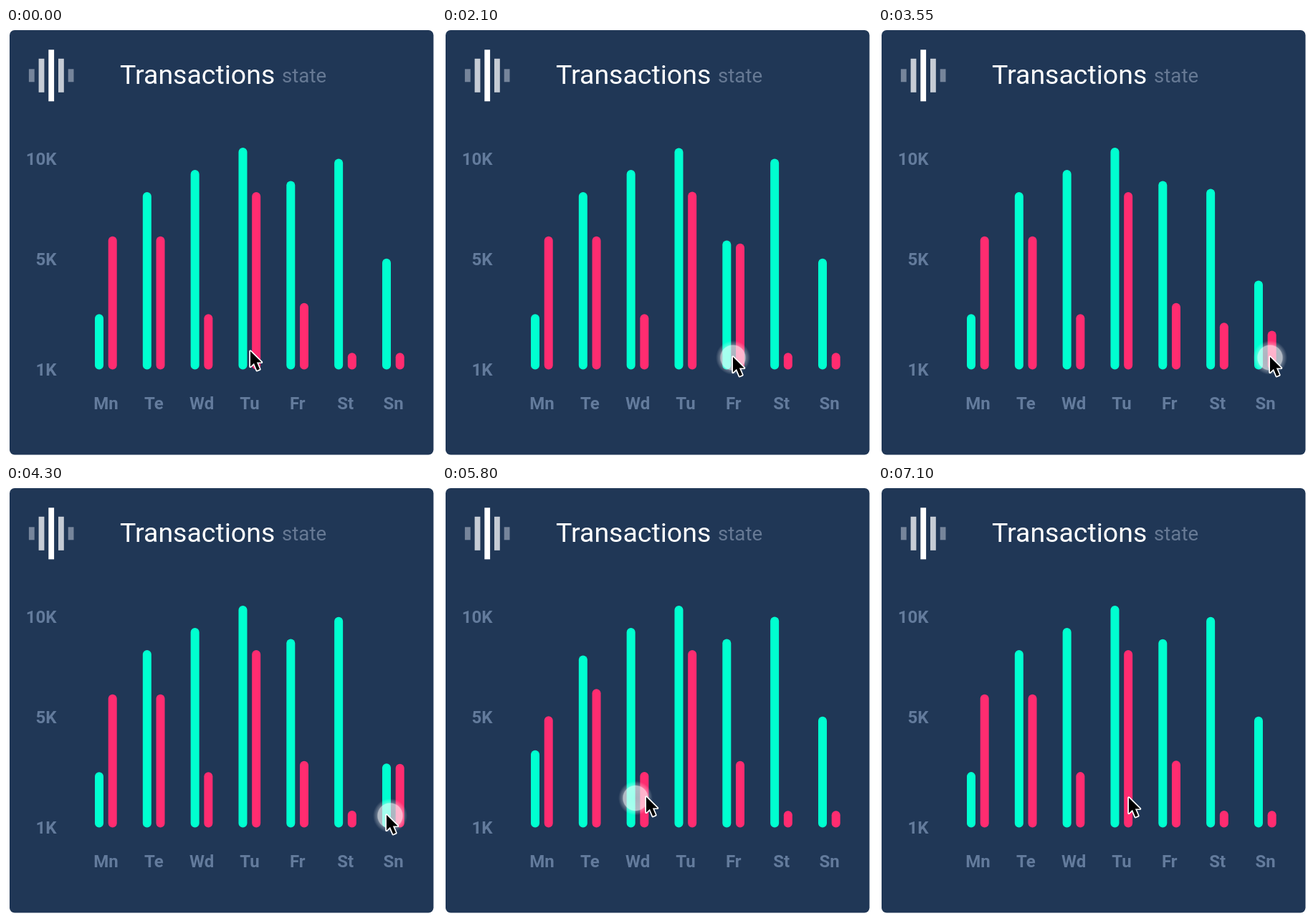
An HTML page with a canvas that plays this animation: 600 by 600 pixels, repeating every 7.15 s.

```html
<!DOCTYPE html>
<html lang="en">
<head>
<meta charset="utf-8">
<title>Transactions chart</title>
<style>
  html, body { margin: 0; width: 100%; height: 100%; overflow: hidden; background: #fff; }
  canvas { display: block; width: 600px; height: 600px; }
</style>
</head>
<body>
<canvas id="stage"></canvas>
<script>
const LOOP = 7150, STEP = 50;
const PRESS = 450, RELEASE = 6420;
const FLOOR = 476.5, UNIT = 15.475;          // chart base line, pixels per value
const BAR_W = 12, PINK_DX = 18.7, FIRST_X = 124, DAY_GAP = 66.83;
const SETTLE = 150, HIT_LAG = 45, TOUCH_LAG = 14, HIT_PAD = 4, TICK = 5;

const days = [
  { name: 'Mn', green: 5,  pink: 12 },
  { name: 'Te', green: 16, pink: 12 },
  { name: 'Wd', green: 18, pink: 5 },
  { name: 'Tu', green: 20, pink: 16 },
  { name: 'Fr', green: 17, pink: 6 },
  { name: 'St', green: 19, pink: 1.5 },
  { name: 'Sn', green: 10, pink: 1.5 }
];
days.forEach((day, i) => day.x = FIRST_X + i * DAY_GAP);

// Pointer rests, each followed by a straight drag: time, x, y
const path = [
  [0, 341, 449], [1400, 341, 449], [1540, 406, 457], [2200, 406, 457],
  [2370, 483, 458], [3300, 483, 458], [3480, 547, 457], [4255, 547, 457],
  [4300, 531, 457], [4430, 531, 457], [4735, 296, 447], [4850, 224, 443],
  [5050, 137, 441], [5640, 137, 438], [5745, 226, 434], [5800, 285, 432],
  [6060, 508, 434], [6200, 508, 434], [6450, 350, 433], [LOOP, 350, 433]
];

const canvas = document.getElementById('stage');
const ctx = canvas.getContext('2d');
const dpr = window.devicePixelRatio || 1;
canvas.width = canvas.height = 600 * dpr;

const clamp01 = v => Math.max(0, Math.min(1, v));
const mix = (a, b, k) => a + (b - a) * k;

function pointerAt(t) {
  const i = Math.max(1, path.findIndex(p => p[0] >= t));
  const [t0, x0, y0] = path[i - 1], [t1, x1, y1] = path[i];
  const k = clamp01((t - t0) / (t1 - t0));
  return { x: mix(x0, x1, k), y: mix(y0, y1, k) };
}

function touches(day, t) {
  if (t < PRESS || t > RELEASE) return false;
  const x = pointerAt(t).x;
  return x > day.x - HIT_PAD && x < day.x + PINK_DX + BAR_W + HIT_PAD;
}

// While touched, both bars of a day ease to their mean; otherwise they ease back.
const ease = 1 - Math.exp(-TICK / SETTLE);
for (const day of days) {
  let k = 0;
  day.pull = [];
  for (let t = 0; t < LOOP; t += TICK) {
    day.pull.push(k);
    k = mix(k, touches(day, t - HIT_LAG) ? 1 : 0, ease);
  }
}

function round(x, y, w, h, r, color) {
  ctx.fillStyle = color;
  ctx.beginPath();
  ctx.roundRect(x, y, w, h, r);
  ctx.fill();
}

function text(str, x, y, size, weight, color, align) {
  ctx.font = `${weight} ${size}px Roboto, sans-serif`;
  ctx.textAlign = align;
  ctx.fillStyle = color;
  ctx.fillText(str, x, y);
}

function drawCard() {
  ctx.fillStyle = '#fff';
  ctx.fillRect(0, 0, 600, 600);
  round(5, 3, 591.5, 592.5, 7, '#203756');

  const tones = ['#fff', '#c6ccd5', '#76859b'], halves = [36, 23.5, 9];
  for (let i = -2; i <= 2; i++) {
    const n = Math.abs(i);
    ctx.fillStyle = tones[n];
    ctx.fillRect(59.3 + i * 13.7, 66.3 - halves[n], 7.8, halves[n] * 2);
  }

  text('Transactions', 159, 78, 37.5, 400, '#fff', 'left');
  text('state', 385, 75.7, 27.7, 400, '#667994', 'left');
  [['10K', 191], ['5K', 330.5], ['1K', 485]].forEach(([label, y]) =>
    text(label, 70.5, y, 24, 700, '#637b9c', 'right'));
}

function drawDay(day, t) {
  const k = day.pull[t / TICK], mean = (day.green + day.pink) / 2;
  const bar = (x, value, color) => {
    const h = mix(value, mean, k) * UNIT;
    round(x, FLOOR - h, BAR_W, h, BAR_W / 2, color);
  };
  bar(day.x, day.green, '#00ffd0');
  bar(day.x + PINK_DX, day.pink, '#ff2c70');
  text(day.name, day.x + 15.5, 532, 24, 700, '#637b9c', 'center');
}

function drawTouch(t) {
  const alpha = Math.min(clamp01((t - PRESS) / 80), clamp01((RELEASE - t) / 80));
  if (!alpha) return;
  const p = pointerAt(t - TOUCH_LAG), x = p.x, y = p.y + 3, R = 24;
  const g = ctx.createRadialGradient(x, y, 0, x, y, R);
  [[0, .62], [17, .66], [18.3, .3], [R, 0]].forEach(([r, a]) =>
    g.addColorStop(r / R, `rgba(255,255,255,${a})`));
  ctx.globalAlpha = alpha;
  ctx.fillStyle = g;
  ctx.beginPath();
  ctx.arc(x, y, R, 0, Math.PI * 2);
  ctx.fill();
  ctx.globalAlpha = 1;
}

const arrow = new Path2D('M0 2V23.5L5 18.8L9.2 28.8L13 27.1L8.9 17.4H15.6Z');

function drawPointer(t) {
  const { x, y } = pointerAt(t);
  ctx.save();
  ctx.translate(x, y);
  ctx.lineJoin = 'round';
  ctx.lineWidth = 3.4;
  ctx.strokeStyle = '#fff';
  ctx.stroke(arrow);
  ctx.fillStyle = '#000';
  ctx.fill(arrow);
  ctx.restore();
}

let start;
function frame(now) {
  if (start === undefined) start = now;
  const t = Math.floor(((now - start) % LOOP) / STEP) * STEP;
  ctx.setTransform(dpr, 0, 0, dpr, 0, 0);
  drawCard();
  days.forEach(day => drawDay(day, t));
  drawTouch(t);
  drawPointer(t);
  requestAnimationFrame(frame);
}
requestAnimationFrame(frame);
</script>
</body>
</html>
```
